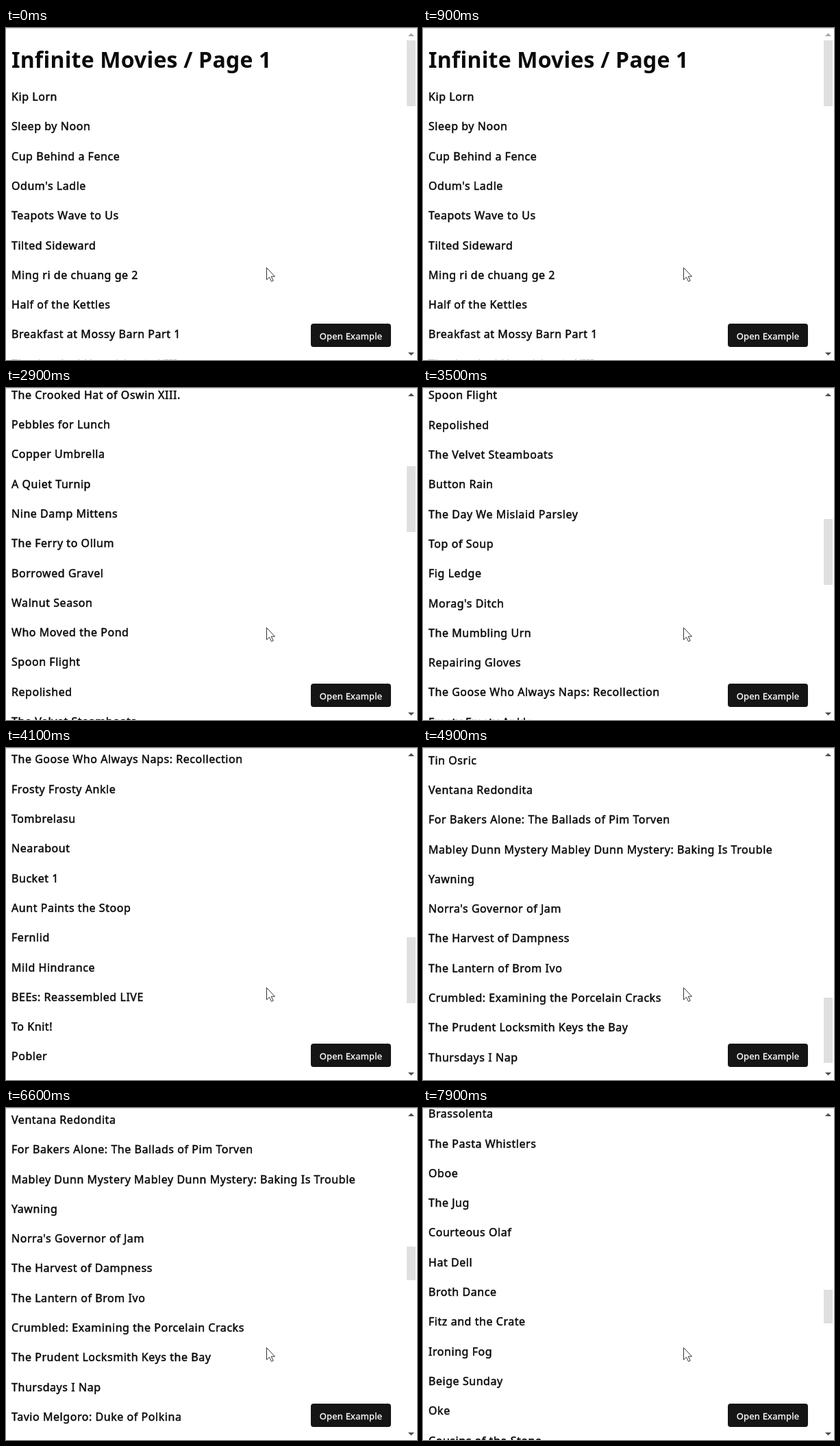
Recreate the animation shown at these times as an HTML page. Size 600 px wide and 484 px high, loop 8000 ms.

```html
<!DOCTYPE html>
<html lang="en">
<head>
<meta charset="utf-8">
<title>Infinite list</title>
<style>
  html, body { margin: 0; width: 100%; height: 100%; overflow: hidden; background: #fff; }
  #stage { position: relative; width: 600px; height: 484px; overflow: hidden; color: #0b0b0b;
    font-family: "Noto Sans", "Open Sans", sans-serif; }
  #page { position: absolute; left: 8px; top: 0; white-space: nowrap; }
  h1, h4 { position: absolute; left: 0; margin: 0; }
  h1 { top: 24px; font-size: 32px; font-weight: 700; line-height: 44px; letter-spacing: .2px; }
  /* A thin stroke on the regular weight gives a semi-bold look. */
  h4 { font-size: 16px; font-weight: 400; line-height: 22px; letter-spacing: .55px;
    -webkit-text-stroke: .5px; }
  #edge { position: absolute; left: 0; top: 0; width: 600px; height: 1px; background: #d6d6d6; }
  #thumb { position: absolute; left: 585px; top: 0; width: 13px; background: #dfdfdf; }
  #button { position: absolute; left: 445px; top: 431px; width: 117px; height: 34px;
    border-radius: 4px; background: #151515; color: #fff; text-align: center;
    font-size: 13px; line-height: 36px; letter-spacing: .2px; -webkit-text-stroke: .3px; }
  svg { position: absolute; left: 0; top: 0; }
</style>
</head>
<body>
<div id="stage">
  <div id="page"><h1>Infinite Movies / Page 1</h1></div>
  <div id="edge"></div>
  <div id="thumb"></div>
  <div id="button">Open Example</div>
  <svg width="600" height="484">
    <path id="up" d="M587 12L591.5 7.5L596 12Z"/>
    <path id="down" d="M587 473L591.5 477.5L596 473Z"/>
    <path d="M380.5 349.5v17.5l4-3.8 3 6.3 2.7-1.2-3-6.1h5.3z" fill="#fff" stroke="#333"/>
  </svg>
</div>
<script>
const firstPage = `Kip Lorn
Sleep by Noon
Cup Behind a Fence
Odum's Ladle
Teapots Wave to Us
Tilted Sideward
Ming ri de chuang ge 2
Half of the Kettles
Breakfast at Mossy Barn Part 1
The Crooked Hat of Oswin XIII.
Pebbles for Lunch
Copper Umbrella
A Quiet Turnip
Nine Damp Mittens
The Ferry to Ollum
Borrowed Gravel
Walnut Season
Who Moved the Pond
Spoon Flight
Repolished
The Velvet Steamboats
Button Rain
The Day We Mislaid Parsley
Top of Soup
Fig Ledge
Morag's Ditch
The Mumbling Urn
Repairing Gloves
The Goose Who Always Naps: Recollection
Frosty Frosty Ankle
Tombrelasu
Nearabout
Bucket 1
Aunt Paints the Stoop
Fernlid
Mild Hindrance
BEEs: Reassembled LIVE
To Knit!
Pobler
Tin Osric
Ventana Redondita
For Bakers Alone: The Ballads of Pim Torven
Mabley Dunn Mystery Mabley Dunn Mystery: Baking Is Trouble
Yawning
Norra's Governor of Jam
The Harvest of Dampness
The Lantern of Brom Ivo
Crumbled: Examining the Porcelain Cracks
The Prudent Locksmith Keys the Bay
Thursdays I Nap`.split("\n");

const secondPage = `Tavio Melgoro: Duke of Polkina
Marmalade Clerk
Two Left Anchors
Ivy Under Glass
Brassolenta
The Pasta Whistlers
Oboe
The Jug
Courteous Olaf
Hat Dell
Broth Dance
Fitz and the Crate
Ironing Fog
Beige Sunday
Oke
Cousins of the Stone`.split("\n");

const LOOP = 8000, TICK = 100, VIEW = 484;
const FIRST_ROW = 89, ROW = 43.3;
const TRACK_TOP = 18, TRACK = 449;
const LOADING_AT = 4800, LOADED_AT = 6200;

// [time in ms, scroll offset in px]
const scrollStops = [
  [2400, 0], [2500, 37], [2900, 480], [3300, 700], [3500, 869], [3800, 1230],
  [4000, 1296], [4200, 1296], [4600, 1680], [4800, 1771], [4900, 1771], [5100, 1815],
  [7000, 1815], [7100, 1860], [7300, 2080], [7400, 2115], [7700, 2115], [7800, 2240], [7900, 2430]
];

const el = id => document.getElementById(id);
const page = el("page"), thumb = el("thumb"), up = el("up"), down = el("down");

function addRow(text, index) {
  const row = document.createElement("h4");
  row.textContent = text;
  row.style.top = Math.round(FIRST_ROW + index * ROW) + "px";
  page.append(row);
  return row;
}

firstPage.forEach(addRow);
const loading = addRow("Loading...", firstPage.length);
const laterRows = secondPage.map((text, i) => addRow(text, firstPage.length + i));

function scrollAt(time) {
  const next = scrollStops.findIndex(stop => stop[0] > time);
  if (next === 0) return 0;
  if (next < 0) return scrollStops.at(-1)[1];
  const [t0, y0] = scrollStops[next - 1], [t1, y1] = scrollStops[next];
  return Math.round(y0 + (y1 - y0) * (time - t0) / (t1 - t0));
}

const show = (node, on) => { node.style.visibility = on ? "visible" : "hidden"; };
const arrowColor = active => active ? "#505050" : "#a8a8a8";

function render(time) {
  const scroll = scrollAt(time);
  const isLoaded = time >= LOADED_AT;
  const isLoading = time >= LOADING_AT && !isLoaded;
  const height = isLoaded ? 4418 : isLoading ? 2299 : 2255;

  page.style.transform = `translateY(${-scroll}px)`;
  show(loading, isLoading);
  laterRows.forEach(row => show(row, isLoaded));

  thumb.style.height = Math.round(VIEW / height * TRACK) + "px";
  thumb.style.transform = `translateY(${Math.round(TRACK_TOP + scroll / height * TRACK)}px)`;
  up.setAttribute("fill", arrowColor(scroll > 0));
  down.setAttribute("fill", arrowColor(scroll < height - VIEW));
}

const start = performance.now();
function frame() {
  const time = (performance.now() - start) % LOOP;
  render(Math.floor(time / TICK) * TICK);
  requestAnimationFrame(frame);
}
frame();
</script>
</body>
</html>
```
